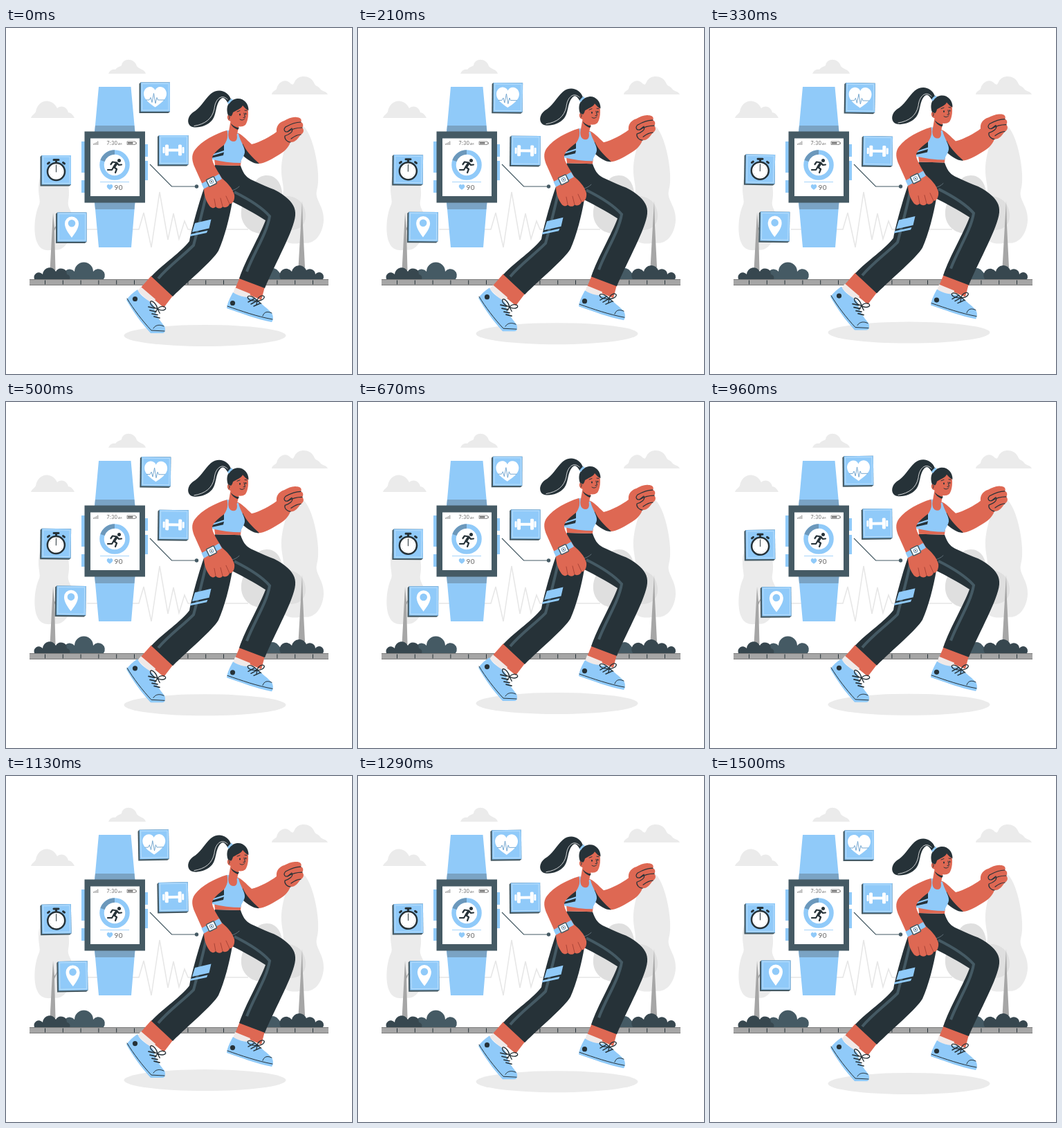
These frames come from a looping animation (500 by 500 pixels, 1.54 s). An HTML page:

```html
<!DOCTYPE html>
<html lang="en">
<head>
<meta charset="utf-8">
<title>Running with a smartwatch</title>
<style>
html, body { margin: 0; height: 100%; overflow: hidden; background: #fff; }
svg { display: block; width: 100vw; height: 100vh; }
.pale { fill: #ebebeb; }
.mist { fill: #dfdfdf; }
.grey { fill: #a6a6a6; }
.dark { fill: #263238; }
.shrub { fill: #37474f; }
.slate { fill: #455a64; }
.blue { fill: #90caf9; }
.skin { fill: #de6853; }
.white { fill: #fff; }
.line { fill: none; stroke: #263238; stroke-linecap: round; stroke-linejoin: round; }
.stripe { fill: none; stroke: #455a64; stroke-width: 4; }
text { font-family: Lato, "Open Sans", sans-serif; fill: #666; }
</style>
</head>
<body>
<svg viewBox="0 0 500 500">
<defs>
  <path id="heart" d="M0 14.500C-8 9-16.500 3-16.500-5C-16.500-11-12-15-7.500-15C-4-15-1-13 0-10C1-13 4-15 7.500-15C12-15 16.500-11 16.500-5C16.500 3 8 9 0 14.500Z"/>
  <g id="tile">
    <path class="slate" d="M2.200 0L0 2V44.500H42L44.500 42.500V0Z"/>
    <rect class="blue" x="2.200" width="42.300" height="42.300"/>
    <rect x="4.200" y="2" width="38.300" height="38.300" fill="none" stroke="#c9e5fc" stroke-width=".7"/>
  </g>
  <path id="bow" class="line" stroke-width="1.300" d="M0 0C-4-7-12-10-13-7C-13-2-5 0 0 0C2-6 10-8 11-4C10 0 4 1 0 0L-2 6M0 0L5 5"/>
</defs>

<!-- Scenery -->
<g class="pale">
  <path d="M384 96C385 91 389 91 391 88C393 78 404 72 411 80C415 83 415 82 418 76C424 67 440 68 445 79C448 86 451 83 454 88C457 92 463 91 465 96Z"/>
  <path d="M148 66C150 61 154 59 158 60C161 56 165 56 167 54C169 43 185 43 189 55C192 60 200 59 202 66Z"/>
  <path d="M36 130C38 125 41 125 43 121C46 103 66 100 74 116C80 111 88 114 90 122C95 123 97 126 99 130Z"/>
  <path d="M69 195C55 197 47 215 47 232C47 243 50 250 48 255C41 270 39 296 45 310C50 323 62 322 69 320C82 325 96 306 97 284C98 264 88 262 90 250C94 230 87 197 69 195Z"/>
  <path d="M426 140C413 142 401 168 398 200C397 220 403 228 400 240C392 251 388 284 396 299C403 313 417 313 428 310C446 315 458 297 459 278C460 258 446 248 449 235C457 214 443 144 426 140Z"/>
</g>
<path class="mist" d="M377 213C364 213 357 223 358 235C343 244 336 264 342 279C348 294 363 298 378 298C397 298 402 279 399 255C402 231 394 213 377 213ZM406 243C393 243 384 257 386 272C388 286 398 292 411 292C426 292 434 283 433 269C432 253 420 243 406 243Z"/>
<path d="M117 291H192L199 267L210 317L222 237L234 306L242 268L250 305L258 279L263 291H350" fill="none" stroke="#e6e6e6" stroke-width="1.500"/>
<path class="grey" d="M68 267L63.500 350H71.500L70 293L76 280L70 289ZM428 250L422.500 346H432L429 285Z"/>
<path class="slate" d="M85 363A8 8 0 0 1 99 352A13.500 13.500 0 0 1 126 352A9 9 0 0 1 141 363ZM376 363A10 10 0 0 1 394 352L403 363Z"/>
<path class="shrub" d="M41 363A7 7 0 0 1 53 356A10 10 0 0 1 72 352A8.500 8.500 0 0 1 88 356A5 5 0 0 1 92 363ZM397 363A8.500 8.500 0 0 1 413 352A11 11 0 0 1 434 350A8 8 0 0 1 447 356A6 6 0 0 1 458 363Z"/>
<path class="grey" d="M34 363H466V372H34Z"/>
<path d="M34 363.500H466M34 371.500H466" stroke="#7c7c7c"/>
<path d="M56 367.500H450" stroke="#263238" stroke-width="6" stroke-dasharray="1 24.800"/>

<!-- Watch -->
<path class="blue" d="M134 85H180.500L186.500 151H128ZM128 251H186.500L181 317H134ZM109 164H115V209H109ZM109 220H115V238H109ZM199 168H205V186H199ZM199 192H205V220H199Z"/>
<path d="M129 141H185.500L186.500 151H128ZM128 251H186.500L185.500 262H129Z" fill="#7aa3c4"/>
<path class="slate" d="M113.500 149.500H201V252.500H113.500Z"/>
<path class="white" d="M122 159.500H193V243H122Z"/>
<path class="grey" d="M126 167H127.300V169H126ZM128 166H129.300V169H128ZM130 165H131.300V169H130ZM132 163.500H133.300V169H132Z"/>
<text x="145.500" y="169" font-size="7" letter-spacing=".5">7:30</text>
<text x="162" y="169" font-size="3.500">AM</text>
<path d="M175 164H187V168.500H175ZM188.500 165V168" fill="none" stroke="#777" stroke-width=".8"/>
<path d="M176 165H183.500V167.500H176Z" fill="#777"/>
<circle cx="157" cy="198" r="18.500" fill="none" stroke="#90caf9" stroke-width="6.500"/>
<path d="M139.500 192A18.500 18.500 0 0 1 157 179.500" fill="none" stroke="#6c98bb" stroke-width="6.500"/>
<circle class="dark" cx="163.500" cy="191.500" r="2.500"/>
<path class="line" stroke-width="2.200" d="M151.500 197L154 193.500L160 194.500L163 198L167 197.500M156 201L160 204L158 209M155.500 201L153 205H147"/>
<path class="line" stroke-width="3.800" d="M159.500 196L156.500 200.500"/>
<path d="M136 222.500H178" stroke="#90caf9" stroke-width=".8"/>
<use href="#heart" class="blue" transform="translate(150 230) scale(.26)"/>
<text x="156.500" y="234" font-size="10" letter-spacing=".5">90</text>

<!-- Feature tiles -->
<g id="tiles">
  <use href="#tile" x="192.500" y="78.500"/>
  <use href="#heart" class="white" x="215.500" y="100"/>
  <path d="M202 104H207L209 100.500L211 107.500L213.500 94.500L216 109L218 100.500L219.500 104H229" fill="none" stroke="#6aa0cc" stroke-width=".9"/>
  <use href="#tile" x="219" y="155"/>
  <path d="M231 176.500H253" stroke="#fff" stroke-width="4"/>
  <g class="white">
    <rect x="226.500" y="172" width="3" height="9" rx="1"/>
    <rect x="230" y="168.500" width="5" height="16" rx="1.500"/>
    <rect x="249" y="168.500" width="5" height="16" rx="1.500"/>
    <rect x="254.500" y="172" width="3" height="9" rx="1"/>
  </g>
  <use href="#tile" x="49.500" y="184"/>
  <path class="line" stroke-width="3" d="M69 190.500H76M72.500 191V195M60.500 196L62.500 194.500M82.500 194.500L84.500 196"/>
  <circle cx="72.500" cy="207.500" r="12.500" fill="#fff" stroke="#263238" stroke-width="2.500"/>
  <path class="line" d="M72.500 198V208"/>
  <circle cx="72.500" cy="207.500" r="9.500" fill="none" stroke="#bbb" stroke-dasharray=".6 4.374"/>
  <use href="#tile" x="72" y="266.500"/>
  <path class="white" fill-rule="evenodd" d="M95 303C89 295 85 289 85 282.500A10 10 0 0 1 105 282.500C105 289 101 295 95 303ZM95 277A5.300 5.300 0 1 0 95 287.600A5.300 5.300 0 1 0 95 277Z"/>
</g>

<path d="M208 197L239.500 229H275" fill="none" stroke="#455a64" stroke-width="1.200"/>
<circle class="slate" cx="275.500" cy="229" r="2.700"/>

<!-- Runner -->
<g id="runner">
  <ellipse class="pale" cx="287.500" cy="444.500" rx="117" ry="15.500"/>

  <!-- Far arm -->
  <path class="skin" d="M333 151C341 153 347 161 355 168C367 165 382 157 391 150C390 142 395 136 402 134C408 131 414 128 420 129C426 129 428 133 426 136C430 137 430 142 428 144C432 148 429 153 426 154C422 160 417 166 411 165C408 173 402 179 393 184C383 190 373 196 365 196L338 176Z"/>
  <path class="line" stroke-width="1.200" d="M426 136C418 136 411 139 404 143M428 144C420 144 413 146 407 150M426 154C421 154 416 157 412 160M404 143C400 147 403 152 408 149L413 145C416 150 409 154 403 156C402 161 407 165 411 165"/>
  <path class="dark" d="M342 167C347 178 356 187 366 196C359 197 350 191 342 184Z"/>

  <!-- Front shoe, sock and ankle -->
  <path class="skin" d="M338 360L374 374L369 393L331 377Z"/>
  <path d="M331 375L353 384L351 391L328 384Z" fill="#f0e9e8"/>
  <path class="blue" d="M328 382C337 389 351 389 361 391C370 400 379 406 384 412C387 417 386 423 384 425C363 421 339 412 319 405C320 397 324 389 328 382Z"/>
  <path class="line" d="M320 402C340 409 363 417 385 421M371 416C373 410 378 409 384 412"/>
  <path class="line" stroke-width="1.500" d="M350 396L359 391M354 399L363 394M358 402L367 398"/>
  <circle class="dark" cx="327.500" cy="397.500" r="3.600"/>
  <use href="#bow" transform="translate(363 394) rotate(-8)"/>

  <!-- Back shoe, sock and ankle -->
  <path class="skin" d="M210 358L241 387L228 404L194 376Z"/>
  <path d="M195 374L216 392L212 400L190 380Z" fill="#f0e9e8"/>
  <path class="blue" d="M190 378C194 388 205 392 213 400C215 413 221 421 229 431C231 436 230 441 226 441H209C196 427 183 409 174 393C178 387 184 382 190 378Z"/>
  <path class="line" d="M175 391C184 406 197 423 210 437L229 438M213 434C216 429 222 428 228 431"/>
  <path class="line" stroke-width="1.700" d="M206 403L215 405M208 408L217 410M211 413L219 414.500M214 417L222 419"/>
  <circle class="dark" cx="186.500" cy="391.500" r="3.600"/>
  <use href="#bow" transform="translate(219 406) rotate(18)"/>

  <!-- Trousers -->
  <path class="dark" d="M302 198L339 199C342 208 346 215 354 219C363 223 371 227 381 231C390 234 398 239 404 244C414 252 419 260 418 271C416 293 390 338 374 376L337 362C347 333 367 300 375 278C358 267 343 259 327 251C323 274 316 302 307 322C299 336 264 365 241 388L210 359C228 340 253 324 265 308C270 283 280 249 286 232Z"/>
  <path class="stripe" d="M330 237C348 246 368 257 381 272C377 297 358 325 348 352M291 232C286 259 278 288 271 314C254 331 235 344 220 362"/>
  <path class="line" style="stroke:#607079" d="M337 229C334 232 330 234 326 235"/>
  <path class="blue" d="M273 282L296.500 276.500L293.500 289.500L269 295ZM267 298L291.500 292.500L290 296L266 301Z"/>

  <!-- Torso -->
  <path class="skin" d="M319 148L333 151L342 170L339 199L302 198L300 180Z"/>
  <path class="blue" d="M319 148L322 148C320 157 322 164 329 164C334 164 335 158 333 152L336 153C338 163 346 173 345 180C344 186 340 189 339 195C326 195 311 193 298 190L297 183L315 169C320 162 321 154 319 148Z"/>
  <path class="dark" d="M315 168V177L297 183L299 178ZM315 179.500L314 184L296 188L297 185Z"/>

  <!-- Ponytail -->
  <path class="dark" d="M325 103C321 91 307 86 296 95C286 104 281 116 270 122C262 128 261 138 267 142C275 146 291 142 298 133C305 124 302 110 311 102C315 99 318 104 321 109Z"/>
  <path class="line" stroke-width=".8" style="stroke:#fff" d="M320 103C311 94 302 104 301 117C298 131 288 139 272 141.500"/>

  <!-- Head -->
  <path class="skin" d="M325 132L337 140L334 153C331 158 325 156 322 149Z"/>
  <path class="dark" d="M325 138C329 142 333 144 337 144L335 147C330 145 326 142 325 138Z"/>
  <path class="skin" d="M325 115C331 107 344 106 349 114C351 123 350 134 346 140C340 145 330 142 325 135C319 134 318 126 323 124Z"/>
  <path class="dark" d="M321 126C317 115 321 104 334 102C343 101 351 109 350.500 119C347 118 345 115 342 112C340 117 332 119 328 122C327 126 325 129 324 127Z"/>
  <path d="M321 109C323 106 325 104 327 103" fill="none" stroke="#90caf9" stroke-width="3"/>
  <path class="line" d="M334 121L338 119.500M345 119L348 119.500M344 123L345.500 129L343 129.500M338 132C341 134 343 133 345 131M322 127C324 128 323 131 322 132"/>
  <ellipse class="dark" cx="338" cy="125" rx="1" ry="1.500"/>
  <ellipse class="dark" cx="346.500" cy="124" rx=".9" ry="1.400"/>

  <!-- Near arm and hand -->
  <path class="skin" d="M319 148C302 153 283 163 273 176C267 184 269 193 273 202L286 231C286 242 289 250 294 257C297 261 301 261 303 258C306 262 312 261 313 258C317 261 322 258 323 254C328 255 331 247 330 241C327 231 320 224 312 217C307 208 300 199 298 190C297 184 303 178 315 169C321 161 321 153 319 148Z"/>
  <path class="line" style="stroke:#a94437" d="M301 247L303 258M310 246L313 258M318 243L323 254"/>
  <path class="blue" d="M282.500 225L308 211L312 218L286 232.500Z"/>
  <g transform="translate(297 222) rotate(-26)">
    <rect x="-6" y="-5.500" width="12" height="11" rx="1" fill="#fff" stroke="#455a64" stroke-width="1.500"/>
    <circle r="2.700" fill="none" stroke="#6c98bb"/>
    <circle class="dark" r=".9"/>
  </g>
</g>
</svg>
<script>
const LOOP = 1540, CYCLE = 1500;
const runner = document.getElementById("runner");
const tiles = document.getElementById("tiles");
// Triangle wave: 0 at the ends, 1 at the middle of the cycle.
const triangle = p => 1 - Math.abs(2 * p - 1);
// Linear sway: 0, +1 at a quarter, -1 at three quarters, 0.
const sway = p => p < .25 ? 4 * p : p < .75 ? 2 - 4 * p : 4 * p - 4;

function draw() {
  const p = Math.min(performance.now() % LOOP / CYCLE, 1);
  runner.setAttribute("transform", `translate(0 ${-10 * triangle(p)})`);
  tiles.setAttribute("transform", `rotate(${sway(p)} 157 194)`);
  requestAnimationFrame(draw);
}
draw();
</script>
</body>
</html>
```
